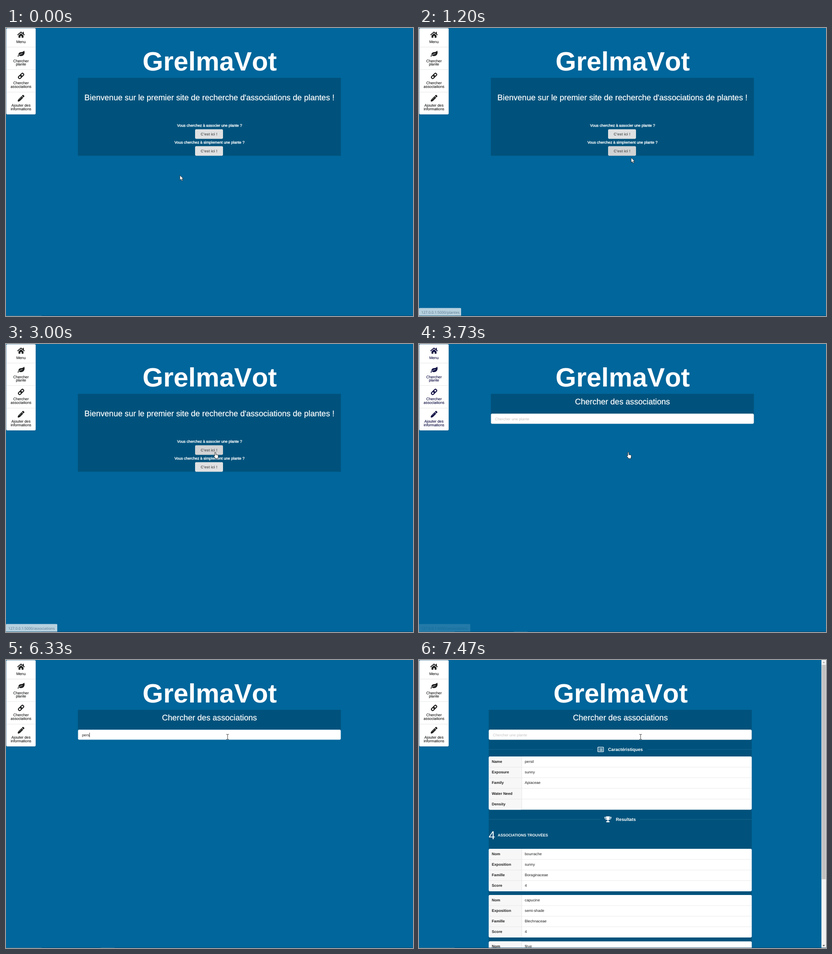
These frames come from a looping animation (889 by 630 pixels, 8000 ms). An HTML page:

```html
<!DOCTYPE html>
<html lang="fr">
<head>
<meta charset="utf-8">
<title>GrelmaVot</title>
<style>
  html, body { margin: 0; width: 100%; height: 100%; overflow: hidden; background: #00669b; }
  svg { display: block; width: 889px; height: 630px; }
  text { font-family: "Liberation Sans", Arial, sans-serif; font-size: 8.25px; text-rendering: geometricPrecision; white-space: pre; }
  .b { font-weight: 700; }
  .mid { text-anchor: middle; }
  .w { fill: #fff; }
  .ink { fill: #1f1f1f; }
  .h1 { font-size: 58px; font-weight: 700; font-kerning: none; }
  .h2 { font-size: 17.6px; stroke: #fff; stroke-width: .25px; }
  .h3 { font-size: 9.7px; font-weight: 700; }
  .ask { stroke: #fff; stroke-width: .35px; }
  .stat { font-size: 25px; }
  .url { font-family: "Open Sans", sans-serif; font-size: 7.9px; }
  #menu text { stroke: currentColor; stroke-width: .12px; }
</style>
</head>
<body>
<svg id="stage" viewBox="0 0 889 630" xmlns="http://www.w3.org/2000/svg"></svg>
<script>
const TICK = 1000 / 15, LOOP = 8000;
const PANEL = '#00527c', BTN_Y = { btn1: 221.6, btn2: 258.6 };
const stage = document.getElementById('stage');
const $ = id => document.getElementById(id);

const text = (x, y, s, cls = '', extra = '') =>
  `<text x="${x}" y="${y}" class="${cls}" ${extra}>${s}</text>`;
const rect = (x, y, w, h, fill, extra = '') =>
  `<rect x="${x}" y="${y}" width="${w}" height="${h}" fill="${fill}" ${extra}/>`;

function sidebar() {
  const labels = [[32.5, 'Menu'], [74.5, 'Chercher'], [82, 'plante'], [123.4, 'Chercher'],
    [131, 'associations'], [172.2, 'Ajouter des'], [179.8, 'informations']];
  return rect(0, 0, 65.2, 189.6, '#0b5783', 'rx="2.4"') + rect(0.6, 0.4, 64.2, 188.6, '#fff', 'rx="2.2"') +
    [41.4, 90.5, 139.8].map(y => rect(0.6, y, 64.2, 0.8, '#dfe0e0')).join('') +
    `<g id="menu">
      ${labels.map(([y, s]) => text(32.7, y, s, 'mid')).join('')}
      <path d="M25.2 15.2L32.8 9L40.4 15.2" fill="none" stroke="currentColor" stroke-width="1.9"/>
      <path d="M36.7 8.6h2.2v5l-2.2-1.8zM27.4 16.2L32.8 11.8L38.2 16.2V21.2H34.2V17.6H31.4V21.2H27.4z"/>
      <path d="M39.7 49.6C42.2 55 39.5 62 32 61.4C30.3 61.3 29.2 60.8 28.7 60.4L26.6 62.8L25 61.8L27.3 58.9C26.9 55 29.5 52.9 33 52.8C36.5 52.7 38.3 51.7 39.7 49.6z"/>
      <path d="M27.2 60.4Q30.5 56.4 36 56" fill="none" stroke="#fff" stroke-width=".9"/>
      <g transform="translate(32.9 104.8) rotate(-45)" fill="none" stroke="currentColor" stroke-width="2">
        <rect x="-7" y="-2.7" width="8.2" height="5.4" rx="2.7"/>
        <rect x="-1.2" y="-2.7" width="8.2" height="5.4" rx="2.7"/>
      </g>
      <g transform="translate(32.8 153.7) rotate(-45)">
        <path d="M-9.4 0V-1.2L-5.6 -2.5H4.2V2.5H-5.6L-9.4 1.2zM5.1 -2.5H7.4Q8.8 -2.5 8.8 -1V1Q8.8 2.5 7.4 2.5H5.1z"/>
        <path d="M-4.6 -.7H2.8" stroke="#fff" stroke-width=".5"/>
      </g>
    </g>`;
}

const button = id => rect(413, BTN_Y[id], 61, 20.8, '', `id="${id}" rx="2.4"`) +
  text(443.5, BTN_Y[id] + 13.1, 'C\'est ici !', 'b mid', 'fill="#5a5a5b"');

const home = () => rect(157, 109, 574.5, 170.4, PANEL) +
  text(444.4, 158.1, 'Bienvenue sur le premier site de recherche d\'associations de plantes !', 'h2 mid w') +
  text(444.7, 215.6, 'Vous cherchez à associer une plante ?', 'mid w ask') + button('btn1') +
  text(444.5, 252.8, 'Vous cherchez à simplement une plante ?', 'mid w ask') + button('btn2');

const search = () => rect(157, 109, 574.5, 65, PANEL, 'id="panel"') +
  text(444.5, 132.1, 'Chercher des associations', 'h2 mid w') +
  rect(157.3, 152.6, 573.9, 21.7, '#fff', 'id="field" rx="2.4" stroke-width=".7"') +
  text(166, 166.8, 'Chercher une plante', '', 'id="hint"') +
  text(166, 166.8, '', 'ink', 'id="typed"') +
  rect(166, 159, 0.8, 10, '#222', 'id="caret"');

function table(y, rowH, rows) {
  const h = rowH * rows.length;
  return rect(152.5, y, 574.3, h, '#fff', 'rx="2.4"') +
    rect(152.5, y, 72, h, '#f7f7f8', 'rx="2.4"') + rect(224.3, y, 0.7, h, '#dedede') +
    rows.map(([key, val], i) => (i ? rect(152.5, y + i * rowH - 0.4, 574.3, 0.7, '#e2e2e2') : '') +
      text(159, y + i * rowH + 13.7, key, 'b ink') +
      text(231, y + i * rowH + 13.7, val, 'ink')).join('');
}

const plant = (y, ...vals) =>
  table(y, 23.25, ['Nom', 'Exposition', 'Famille', 'Score'].map((k, i) => [k, vals[i]]));

const divider = (y, x1, x2) =>
  rect(152.5, y, x1 - 152.5, 0.8, '#1f6a93') + rect(x2, y, 727 - x2, 0.8, '#1f6a93');

function results() {
  return divider(195.3, 380, 499) + text(413, 199, 'Caractéristiques', 'h3 w') +
    `<rect x="390.6" y="190.7" width="12.4" height="10" rx="1" fill="none" stroke="#fff" stroke-width="1.3"/>
     <path d="M392.5 193.5h1.4m1 0h6.2M392.5 195.8h1.4m1 0h6.2M392.5 198.1h1.4m1 0h6.2" stroke="#fff" stroke-width="1.2"/>` +
    table(211, 23.3, [['Name', 'persil'], ['Exposure', 'sunny'], ['Family', 'Apiaceae'], ['Water Need', ''], ['Density', '']]) +
    divider(348.3, 396, 483) + text(430, 352, 'Resultats', 'h3 w') +
    `<path d="M409 342h7.4v4.4q-.4 3.2-2.8 4v2.2h2.6v2.4h-7v-2.4h2.6v-2.2q-2.4-.8-2.8-4z" fill="#fff"/>
     <path d="M409 344h-3.2q0 4 4.4 5M416.4 344h3.2q0 4-4.4 5" fill="none" stroke="#fff" stroke-width="1.3"/>` +
    text(152.2, 391.8, '4', 'stat w') + text(172, 386.2, 'ASSOCIATIONS TROUVÉES', 'b w') +
    plant(413, 'bourrache', 'sunny', 'Boraginaceae', 4) +
    plant(514, 'capucine', 'semi-shade', 'Blechnaceae', 4) +
    plant(615.6, 'fève', 'sunny', 'Fabaceae', 4);
}

const scrollbar = () => rect(879, 0, 10, 630, '#f1f1f1') + rect(879.8, 10.5, 8.6, 469, '#c1c1c1') +
  '<path d="M881.5 6.5l2.7-3 2.7 3z" fill="#a3a3a3"/><path d="M881.5 623.5l2.7 3 2.7-3z" fill="#505050"/>';

const cursors = `<g id="cursor">
  <path id="arrow" d="M0 0V10.6L2.5 8.3L4.2 12.2L6 11.4L4.3 7.7H7.5z" fill="#fff" stroke="#111" stroke-width=".7"/>
  <path id="hand" d="M-1 1Q-1-.4 .2-.4Q1.3-.4 1.3 1V5L5.3 5.8Q7 6.3 6.8 8.2L6 11.5V13.8H.3V12.5L-3 8.5Q-3.6 7-2.3 6.9L-1 8z" fill="#fff" stroke="#111" stroke-width=".8"/>
  <path id="beam" d="M-2.8-5.3H-.8L0-4.7L.8-5.3H2.8M0-4.7V4.9M-2.8 5.5H-.8L0 4.9L.8 5.5H2.8" fill="none" stroke="#222" stroke-width=".9"/>
</g>`;

stage.innerHTML = rect(0, 0, 889, 630, '#00669b') +
  `<g id="page">${text(445, 92.5, 'GrelmaVot', 'h1 mid w')}
    <g id="home">${home()}</g><g id="search">${search()}</g></g>
  <g id="results">${results()}${scrollbar()}</g>${sidebar()}
  <g id="status"><rect id="bubble" y="612.5" height="18" rx="1.5" fill="#b7d1df"/>
    ${text(5, 624.8, '', 'url', 'id="url" fill="#5b7890"')}</g>
  ${rect(0, 629.2, 889, 0.8, '#0a4468')}${rect(0, 629.2, 78, 0.8, '#33708f')}
  ${rect(207, 629.2, 30, 0.8, '#33708f', 'id="tab"')}${cursors}`;

// Keyframes: [ms, value, value...], linear between neighbours.
const PATH = [[0, 379.8, 322.4], [130, 396, 296], [270, 430, 238], [400, 455, 184], [470, 461, 175],
  [600, 462, 196], [730, 457, 232], [800, 454.5, 241.5], [930, 455, 262], [1130, 461, 278],
  [1330, 468, 294], [1530, 470, 300], [2400, 470, 300], [2470, 466, 291], [2670, 460, 266],
  [2870, 457, 242], [3000, 457, 237], [4000, 457, 237], [4200, 468, 207], [4470, 484, 168]];
const STATUS = [[200, 0], [270, 1], [1200, 1], [1470, 0], [2600, 0], [2670, 1], [3600, 1], [3730, .2], [3800, 0]];
const KEYS = [5800, 5930, 6130, 6330, 6470, 6600];

function track(keys, t) {
  const i = keys.findIndex(k => k[0] > t);
  if (i < 0) return keys[keys.length - 1].slice(1);
  if (!i) return keys[0].slice(1);
  const a = keys[i - 1], b = keys[i], p = (t - a[0]) / (b[0] - a[0]);
  return a.slice(1).map((v, j) => v + (b[j + 1] - v) * p);
}

const mix = (a, b, p) => `rgb(${a.map((v, i) => Math.round(v + (b[i] - v) * p))})`;
const show = (id, on) => $(id).setAttribute('visibility', on ? 'inherit' : 'hidden');
const set = (id, name, value) => $(id).setAttribute(name, value);

function over(t, id) {
  const [x, y] = track(PATH, t), top = BTN_Y[id];
  return x > 413 && x < 474 && y > top && y < top + 20;
}
// Button colour eases over three ticks after the pointer enters or leaves.
const hover = (t, id) => [0, 1, 2].reduce((n, k) => n + over(Math.max(0, t - k * TICK), id), 0) / 3;

function draw(ms) {
  const t = Math.floor((ms + 5) / TICK) * TICK + 1;
  const isHome = t < 3660, isDone = t >= 7395;
  show('home', isHome);
  show('search', !isHome);
  show('tab', !isHome);
  show('results', isDone);
  set('page', 'transform', `translate(${isDone ? -4.7 : 0} 0)`);
  set('panel', 'height', isDone ? 521 : 65);

  for (const id in BTN_Y) set(id, 'fill', mix([224, 225, 226], [202, 203, 205], hover(t, id)));

  const navy = t > 3660 && t < 3795 ? (t < 3725 ? 1 : .6) : 0;
  const ink = mix([27, 28, 29], [0, 0, 90], navy);
  set('menu', 'fill', ink);
  set('menu', 'color', ink);

  const focus = isDone ? 0 : Math.min(1, Math.max(0, (t - 4665) / 200));
  const typed = isDone ? '' : 'persil'.slice(0, KEYS.filter(k => t >= k - 5).length);
  set('field', 'stroke', mix([205, 212, 217], [133, 183, 217], focus));
  set('hint', 'fill', mix([195, 195, 195], [130, 130, 130], focus));
  show('hint', !typed);
  $('typed').textContent = typed;
  set('caret', 'x', 166.2 + (typed ? $('typed').getComputedTextLength() : 0));
  show('caret', t > 4725 && t < 7125 && !(t > 5265 && t < 5795));

  const second = t > 860 && t < 2860;
  set('status', 'opacity', track(STATUS, t)[0]);
  $('url').textContent = '127.0.0.1:5000/' + (second ? 'plantes' : 'associations');
  set('bubble', 'width', second ? 92 : 112);

  const [x, y] = track(PATH, t);
  const hand = over(t, 'btn1') || over(t, 'btn2');
  const beam = t > 4000 && y < 175 && !(t > 7125 && t < 7260);
  set('cursor', 'transform', `translate(${x.toFixed(1)} ${y.toFixed(1)})`);
  show('hand', hand);
  show('beam', beam);
  show('arrow', !hand && !beam);
}

const start = performance.now();
function loop() {
  draw((performance.now() - start) % LOOP);
  requestAnimationFrame(loop);
}
loop();
</script>
</body>
</html>
```
